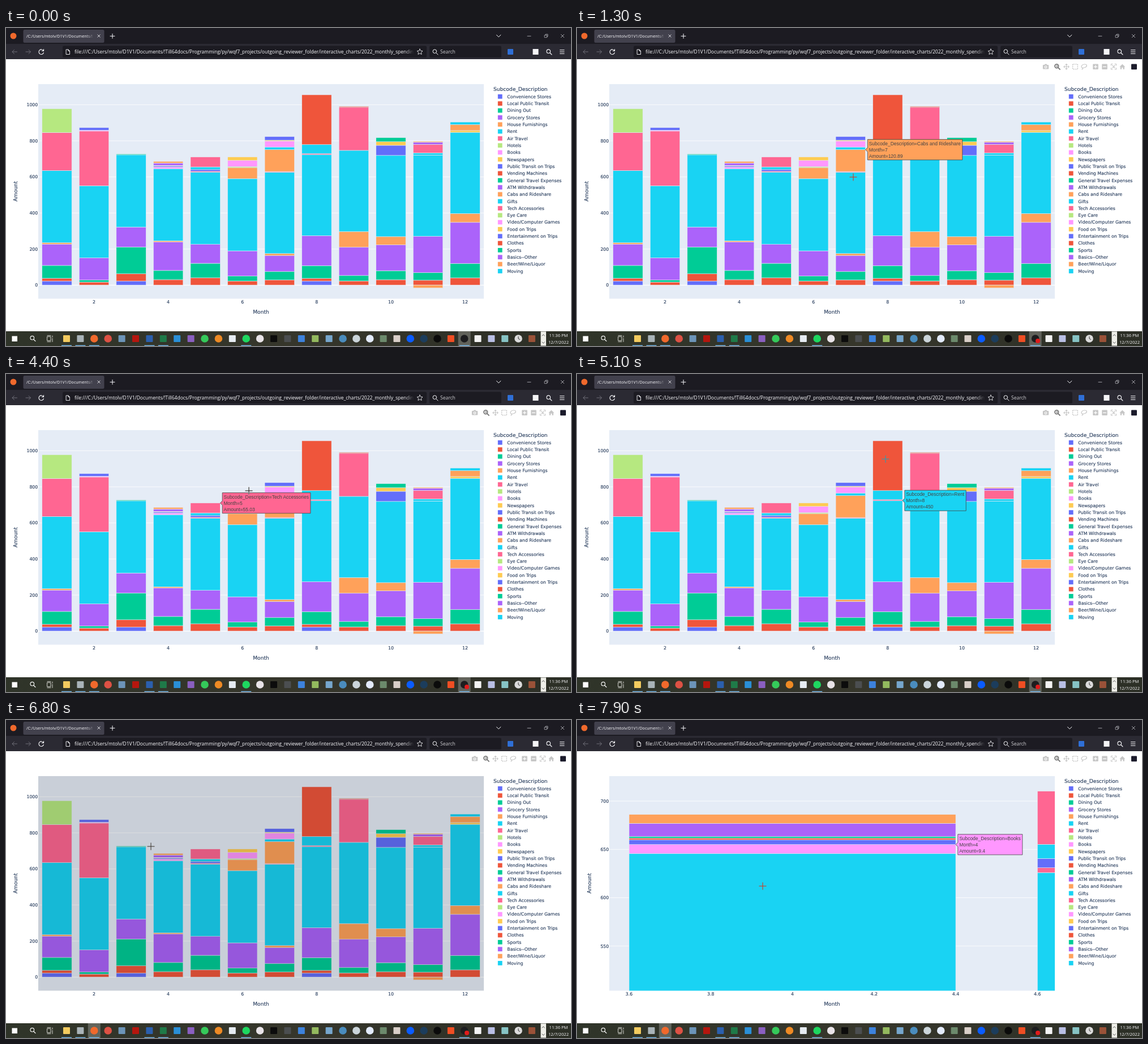
Animation of 998 by 561 pixels, one loop 8000 ms. Source, as an HTML page:

```html
<!DOCTYPE html>
<html lang="en">
<head>
<meta charset="utf-8">
<title>Monthly spending</title>
<style>
html, body { margin: 0; width: 100%; height: 100%; overflow: hidden; background: #fff; }
svg { display: block; width: 998px; height: 561px; }
text { white-space: pre; }
.ui { font-family: "Open Sans", sans-serif; fill: #fbfbfe; }
.plot { font-family: "DejaVu Sans", sans-serif; fill: #2a3f5f; stroke: #2a3f5f; stroke-width: .15; }
.tip { font-family: "Liberation Sans", Arial, sans-serif; fill: #444; }
.line { fill: none; stroke-linecap: round; stroke-linejoin: round; }
#cursor { mix-blend-mode: difference; stroke-linecap: butt; }
</style>
</head>
<body>
<svg id="stage" viewBox="0 0 998 561" xmlns="http://www.w3.org/2000/svg"></svg>
<script>
const LOOP = 8000, STEP = 100;
const COLORS = ['#636efa', '#ef553b', '#00cc96', '#ab63fa', '#ffa15a',
  '#19d3f3', '#ff6692', '#b6e880', '#ff97ff', '#fecb52'];
const NAMES = ('Convenience Stores|Local Public Transit|Dining Out|Grocery Stores|House Furnishings|Rent|' +
  'Air Travel|Hotels|Books|Newspapers|Public Transit on Trips|Vending Machines|General Travel Expenses|' +
  'ATM Withdrawals|Cabs and Rideshare|Gifts|Tech Accessories|Eye Care|Video/Computer Games|Food on Trips|' +
  'Entertainment on Trips|Clothes|Sports|Basics--Other|Beer/Wine/Liquor|Moving').split('|');
const colorOf = i => COLORS[i % 10];

// Running totals after dining and after groceries, by month; the layers below follow from them.
const DINING = [109, 28, 211, 81, 121, 50, 75, 108, 53, 80, 69, 120];
const GROCERY = [227, 151, 322, 239, 226, 190, 164, 274, 210, 223, 271, 348];
// Occasional spending: { month: amount }
const OCCASIONAL = {
  'House Furnishings': { 1: 8, 4: 6.6, 7: 11, 9: 87, 10: 46, 12: 49 },
  'Air Travel': { 1: 211, 2: 303, 9: 239 },
  'Hotels': { 1: 132 },
  'Books': { 4: 9.4 },
  'Newspapers': { 12: 10 },
  'Public Transit on Trips': { 2: 14, 5: 9.6, 10: 56 },
  'Vending Machines': { 4: 1.7 },
  'General Travel Expenses': { 4: 1.7 },
  'ATM Withdrawals': { 4: 13.5 },
  'Cabs and Rideshare': { 6: 62, 7: 120.89, 11: -16 },
  'Gifts': { 5: 14.6, 7: 14.5, 8: 50, 11: 12 },
  'Tech Accessories': { 5: 55.03, 11: 47 },
  'Video/Computer Games': { 6: 34, 7: 33 },
  'Food on Trips': { 6: 19.5, 10: 20 },
  'Entertainment on Trips': { 7: 20 },
  'Clothes': { 8: 276 },
  'Sports': { 10: 23 },
  'Basics--Other': { 11: 12 },
  'Beer/Wine/Liquor': { 4: 9.2, 12: 33 },
  'Moving': { 12: 14 }
};
// Months with a sliver of the same small size
const MINOR = 5;
const SLIVERS = {
  'Air Travel': [5, 7, 8], 'Books': [2], 'Public Transit on Trips': [4], 'General Travel Expenses': [3],
  'Eye Care': [6], 'Food on Trips': [7], 'Clothes': [9], 'Beer/Wine/Liquor': [11]
};

function amountOf(name, month) {
  const dining = DINING[month - 1], store = [1, 3, 8].includes(month) ? 22 : 0, transit = 10 + dining / 4;
  switch (name) {
    case 'Convenience Stores': return store;
    case 'Local Public Transit': return transit - store;
    case 'Dining Out': return dining - transit;
    case 'Grocery Stores': return GROCERY[month - 1] - dining;
    case 'Rent': return month < 7 ? 400 : 450;
  }
  return OCCASIONAL[name]?.[month] ?? (SLIVERS[name]?.includes(month) ? MINOR : 0);
}

const segments = [];
for (let month = 1; month <= 12; month++) {
  let sum = 0;
  NAMES.forEach((name, cat) => {
    const amount = amountOf(name, month);
    if (!amount) return;
    const lo = amount < 0 ? amount : sum, hi = lo + Math.abs(amount);
    if (amount > 0) sum = hi;
    segments.push({ month, cat, amount, lo, hi });
  });
}

const FULL = { x: m => 24.4 + 65.55 * m, y: v => 453.6 - 0.3182 * v };
const ZOOM = { x: m => 380.5 + 721.25 * (m - 4), y: v => 143 + 1.705 * (700 - v) };

// SVG string helpers
const rect = (x, y, w, h, fill, more = '') => `<rect x="${x}" y="${y}" width="${w}" height="${h}" fill="${fill}" ${more}/>`;
const circle = (x, y, r, fill) => `<circle cx="${x}" cy="${y}" r="${r}" fill="${fill}"/>`;
const line = (d, color, w = 1, more = '') => `<path class="line" d="${d}" stroke="${color}" stroke-width="${w}" ${more}/>`;
const text = (x, y, s, size, cls, more = '') => `<text x="${x}" y="${y}" font-size="${size}" class="${cls}" ${more}>${s}</text>`;
const lens = (x, y, color, w = 1.1) => line(`M${x + 2} ${y + 2}l3 3M${x + 2.6} ${y - 0.8}a3.3 3.3 0 1 1-6.6 0a3.3 3.3 0 1 1 6.6 0`, color, w);
const cross = (x, y, r, color) => line(`M${x - r} ${y - r}l${2 * r} ${2 * r}m0 ${-2 * r}l${-2 * r} ${2 * r}`, color, 0.8);
const MIDDLE = 'text-anchor="middle"';
const range = (from, to, count) => Array.from({ length: count }, (_, i) => from + (to - from) * i / (count - 1));

function chart(id, s, xTicks, yTicks, titleX) {
  const bars = segments.map(g => {
    const x = s.x(g.month - 0.4), y = s.y(g.hi);
    return rect(x, y, s.x(g.month + 0.4) - x, s.y(g.lo) - y, colorOf(g.cat), 'stroke="#e5ecf6" stroke-width=".6"');
  }).join('');
  const grid = yTicks.map(v => line(`M57 ${s.y(v)}H844`, '#fff', v ? 0.8 : 1.4)).join('');
  return `<g id="${id}">${rect(57, 99, 787, 378.5, '#e5ecf6')}${grid}<g clip-path="url(#area)">${bars}</g>` +
    xTicks.map(v => text(s.x(v), 486.4, +v.toFixed(1), 7.8, 'plot', MIDDLE)).join('') +
    yTicks.map(v => text(56.3, s.y(v) + 2.8, v, 7.8, 'plot', 'text-anchor="end"')).join('') +
    text(0, 0, 'Amount', 9.1, 'plot', `${MIDDLE} transform="translate(${titleX} 288) rotate(-90)"`) + '</g>';
}

function legend() {
  return text(861, 110.8, 'Subcode_Description', 9.1, 'plot') + NAMES.map((name, i) => {
    const y = 120.9 + 12.32 * i;
    return rect(868.8, y - 3.9, 7.8, 7.8, colorOf(i)) + text(885.3, y + 2.8, name, 7.8, 'plot');
  }).join('');
}

function browser() {
  const white = '#fbfbfe', dim = '#6f6e78', soft = '#c4c4ca';
  const path = '/C:/Users/mtolv/D1V1/Documents/!';
  const url = `file://${path}Till64docs/Programming/py/wqf7_projects/outgoing_reviewer_folder/interactive_charts/2022_monthly_spending`;
  return rect(0, 0, 998, 28, '#1c1b22') + rect(0, 28, 998, 27, '#2b2a33') +
    circle(13, 14, 5.5, '#f0692c') + rect(30.5, 3, 143, 23, '#42414d', 'rx="2.5"') +
    `<g clip-path="url(#tabClip)">${text(36, 17, path, 7.1, 'ui')}</g>` + rect(140, 6, 18, 16, 'url(#tabFade)') +
    cross(164, 14, 2.2, white) + line('M184 14.3h8m-4-4v8', white) +
    line('M866.5 12.2l3.7 3.7l3.7-3.7', white) + line('M921 14.3h6', soft, 0.8) +
    line('M951.5 12.7h4v4h-4zM953 12.5v-1.5h4v4h-1.3', soft, 0.7) + cross(983, 14, 2.7, soft) +
    line('M19.5 42h-8.5m3.5-3.5l-3.5 3.5l3.5 3.5M35 42h8.5m-3.5-3.5l3.5 3.5l-3.5 3.5', dim) +
    line('M66 40a4.3 4.3 0 1 0 .4 3.5M66.5 37.5v3h-3', white, 1.1) +
    rect(100, 31.5, 643, 20.5, '#1c1b22', 'rx="2.5"') + line('M106.5 38h3.5l2.5 2.5v6h-6zM110 38v2.5h2.5', white, 0.9) +
    `<g clip-path="url(#urlClip)">${text(121, 45.3, url, 8.5, 'ui')}</g>` + rect(704, 34, 17, 16, 'url(#urlFade)') +
    line('M731 37l1.5 3.2l3.5 .4l-2.6 2.4l.7 3.5l-3.1-1.8l-3.1 1.8l.7-3.5l-2.6-2.4l3.5-.4z', white, 0.8) +
    rect(748, 31.5, 127, 20.5, '#1c1b22', 'rx="2.5"') + lens(758, 42, white, 1) +
    text(767, 45.3, 'Search', 8.5, 'ui', 'opacity=".8"') +
    rect(886, 37, 10, 10, '#2f6fd6', 'rx="1"') + rect(930.5, 37, 10, 10, '#f4f4f6') +
    lens(959, 42, white) + line('M978.5 38.8h7.5m-7.5 3.2h7.5m-7.5 3.2h7.5', white);
}

function modebar() {
  const gray = '#c7c7c7', active = '#7c7c7c';
  return '<g id="modebar">' + rect(822.8, 65, 10.4, 7.6, gray, 'rx="1"') + rect(826, 63.6, 4, 2, gray) +
    circle(828, 68.8, 2.4, '#fff') + circle(828, 68.8, 1.3, gray) +
    lens(848, 68, active, 1.8) + line('M846.2 67.2h3.2m-1.6-1.6v3.2', active, 0.8) +
    line('M859.8 68.3h9.4m-4.7-4.7v9.4m-1.5-8l1.5-1.5l1.5 1.5m-3 6.5l1.5 1.5l1.5-1.5m-4.7-4.7l-1.5 1.5l1.5 1.5m6.4-3l1.5 1.5l-1.5 1.5', gray, 1.1) +
    rect(875.6, 63.8, 8.8, 8.8, 'none', `stroke="${gray}" stroke-width="1.3" stroke-dasharray="2 1"`) +
    line('M893 70.5c-4-2-1.5-6 3-6.5c5-.3 6 3.5 1.5 5.5c-2 .8-4.5.2-4 1.7c.3 1-.6 1.5-1.5 1.5', gray, 1.2) +
    [916, 932].map(x => rect(x - 4.8, 63.5, 9.6, 9.6, gray, 'rx="1"')).join('') +
    line('M913.5 68.3h5m-2.5-2.5v5M929.5 68.3h5', '#fff', 1.3) +
    line('M943.5 66v-2.5h2.5m4 0h2.5v2.5m0 4.5v2.5h-2.5m-4 0h-2.5v-2.5M945.8 66l4.4 4.6m0-4.6l-4.4 4.6', gray, 1.2) +
    `<path d="M958.3 68.6l5-4.8l5 4.8h-1.4v4.1h-2.5v-2.9h-2.2v2.9h-2.5v-4.1z" fill="${gray}"/>` +
    rect(979, 63.4, 10, 9.8, '#1b1b2b', 'rx="1"') + '</g>';
}

// Application tiles, left to right: "o" makes a disc, "_" marks a running one.
const APPS = ('_#f3cb5f _#a9b3b8 _o#f0692c o#dd5144 #6c94b8 #b5160e _#2b5fad _#1f7a48 #2a8fd6 #8a5fc0 o#35c95a o#ee8a24 ' +
  '#e6ecf2 _o#1ed760 o#e9e4e8 #0c0c0c #4b4e50 #3d82dc #93b95e #76a6cc o#4a8cbd o#cbd5da o#e3ebfb #6c8a6c #d9cfc8 ' +
  'o#0b5cff o#1c3d5c o#0b0b0b #f04e23 _o#1d1d1f #f3f3f3 #b9bfe4 #86c3c4 o#dcdcdc #9a5238').split(' ');
const appX = i => 107 + 24.4 * i - 0.55 * Math.max(0, i - 20);
const BROWSER_APP = 2, RECORDER_APP = 29;

function taskbar() {
  const icons = APPS.map((app, i) => {
    const x = appX(i), color = app.slice(app.indexOf('#'));
    return (app.includes('o#') ? circle(x, 548, 6.8, color) : rect(x - 6, 542, 12, 12, color, 'rx="1"')) +
      (app[0] === '_' ? rect(x - 9, 559.6, 18, 1.4, '#76b9ed') : '');
  }).join('');
  return rect(0, 535, 998, 26, 'url(#bar)') + rect(0, 535, 22, 26, '#fff', 'id="focus" opacity=".24"') +
    rect(10.5, 543.5, 9.5, 9.5, '#fff') + lens(47, 547.5, '#fff') +
    line('M73 544.5h6v7h-6zM73 542.5h6M73 553.5h6M82 543v2.5m0 2v6', '#e6e6e0', 0.9) +
    icons + line('M905 544.5v3.5l2.5 1.5', '#333', 1) + `<g id="rec">${circle(814, 552, 4, '#e01b1b')}</g>` +
    rect(944.5, 535.5, 9.5, 25, '#efefe9') + line('M947 543l2.2-2.2l2.2 2.2M947 554l2.2 2.2l2.2-2.2', '#444', 0.9) +
    text(976, 545, '11:36 PM', 7.6, 'ui', MIDDLE) + text(976, 557, '12/7/2022', 7.6, 'ui', MIDDLE);
}

const fade = (id, color) => `<linearGradient id="${id}"><stop stop-color="${color}" stop-opacity="0"/><stop offset="1" stop-color="${color}"/></linearGradient>`;
const clip = (id, x, y, w, h) => `<clipPath id="${id}">${rect(x, y, w, h, '#000')}</clipPath>`;
document.getElementById('stage').innerHTML = '<defs>' + fade('tabFade', '#42414d') + fade('urlFade', '#1c1b22') +
  '<linearGradient id="bar"><stop stop-color="#2f3429"/><stop offset=".5" stop-color="#36362b"/><stop offset="1" stop-color="#2c2f26"/></linearGradient>' +
  clip('area', 57, 99, 787, 378.5) + clip('tabClip', 36, 4, 122, 20) + clip('urlClip', 121, 32, 599, 20) + '</defs>' +
  rect(0, 0, 998, 561, '#fff') +
  chart('full', FULL, range(2, 12, 6), range(0, 1000, 6), 20) +
  chart('zoomed', ZOOM, range(3.6, 4.6, 6), range(550, 700, 4), 25) +
  text(450.5, 504, 'Month', 9.1, 'plot', MIDDLE) + legend() + modebar() + browser() + taskbar() +
  '<path id="shade" fill-rule="evenodd"/><path id="corners" fill="#fff" stroke="#444" stroke-width=".6"/>' +
  '<g id="label"></g>' + line('M-6.5 0h13M0 -6.5v13', '#fff', 1, 'id="cursor"');

const $ = id => document.getElementById(id);
const show = (id, on) => { $(id).style.display = on ? '' : 'none'; };

// Pointer stops; it waits at a stop until "leave".
const STOPS = [
  { at: 600, x: 1000, y: 170 },
  { at: 1200, x: 490, y: 232 },
  { at: 1300, x: 488, y: 263 },
  { at: 2600, x: 421, y: 302, leave: 3600 },
  { at: 4300, x: 362, y: 236 },
  { at: 4400, x: 429, y: 206 },
  { at: 4600, x: 523, y: 376, leave: 4800 },
  { at: 5100, x: 545, y: 150 },
  { at: 5400, x: 600, y: 190, leave: 5570 },
  { at: 6000, x: 327, y: 215 },
  { at: 6400, x: 256, y: 223, leave: 6900 },
  { at: 7300, x: 373, y: 328 },
  { at: 7400, x: 328, y: 293, leave: LOOP }
];
const PRESS = 6700, DRAG = 6900, RELEASE = 7600;

function pointer(t) {
  const k = STOPS.findLastIndex(s => s.at <= t);
  if (k < 0) return null;
  const a = STOPS[k], b = STOPS[k + 1] || a, from = a.leave ?? a.at;
  const f = t <= from ? 0 : (t - from) / (b.at - from);
  return { x: a.x + (b.x - a.x) * f, y: a.y + (b.y - a.y) * f };
}

function segmentAt(p) {
  return p && segments.find(g => Math.abs(p.x - FULL.x(g.month)) < 26.3 && p.y >= FULL.y(g.hi) && p.y < FULL.y(g.lo));
}

function drawLabel(g, s) {
  const box = $('label');
  box.innerHTML = '';
  if (!g) return;
  const x = s.x(g.month + 0.4), y = s.y(g.hi);
  const rows = [`Subcode_Description=${NAMES[g.cat]}`, `Month=${g.month}`, `Amount=${+g.amount.toFixed(2)}`];
  box.innerHTML = `<path fill="${colorOf(g.cat)}" stroke="#444" stroke-width=".8"/>` +
    rows.map((row, i) => text(x + 6.2, y - 7.9 + 11 * i, row, 8.45, 'tip')).join('');
  const w = box.querySelector('text').getComputedTextLength() + 5.4;
  box.firstChild.setAttribute('d', `M${x} ${y}l3.8 -3.8v-14.3h${w}v36.2h${-w}v-14.3z`);
}

function drawZoomBox(t, p) {
  const pressed = t >= PRESS && t < RELEASE, dragging = pressed && t > DRAG;
  show('shade', pressed);
  show('corners', dragging);
  if (!pressed) return;
  const l = 257, top = 223, r = Math.max(l, p.x), b = Math.max(top, p.y);
  $('shade').setAttribute('d', 'M57 99H844V477.5H57z' + (dragging ? `M${l} ${top}H${r}V${b}H${l}z` : ''));
  $('shade').setAttribute('opacity', Math.min(0.4, Math.max(0, (t - 6740) / 500)));
  const c = Math.min(r - l, b - top, 13) / 2;
  const bracket = (x, y, i, j) => `M${x - 2.3 * i} ${y + c * j}h${2 * i}v${-c * j}h${c * i}v${-2 * j}h${-(c + 2) * i}z`;
  $('corners').setAttribute('d', bracket(l, top, 1, 1) + bracket(r, top, -1, 1) + bracket(l, b, 1, -1) + bracket(r, b, -1, -1));
}

function draw(t) {
  const p = pointer(t), zoomed = t >= RELEASE;
  show('full', !zoomed);
  show('zoomed', zoomed);
  show('modebar', p);
  show('rec', t >= STEP);
  $('focus').setAttribute('x', appX(t < PRESS ? RECORDER_APP : BROWSER_APP) - 11);
  show('cursor', p);
  if (p) $('cursor').setAttribute('transform', `translate(${p.x} ${p.y})`);
  drawZoomBox(t, p);
  // The tooltip trails the pointer by one step.
  if (t > RELEASE) drawLabel(segments.find(g => g.month === 4 && NAMES[g.cat] === 'Books'), ZOOM);
  else drawLabel(t < PRESS && segmentAt(pointer(t - STEP)), FULL);
}

let last = -1;
const start = performance.now();
function tick() {
  const t = Math.floor(((performance.now() - start) % LOOP) / STEP) * STEP;
  if (t !== last) draw(last = t);
  requestAnimationFrame(tick);
}
tick();
</script>
</body>
</html>
```
